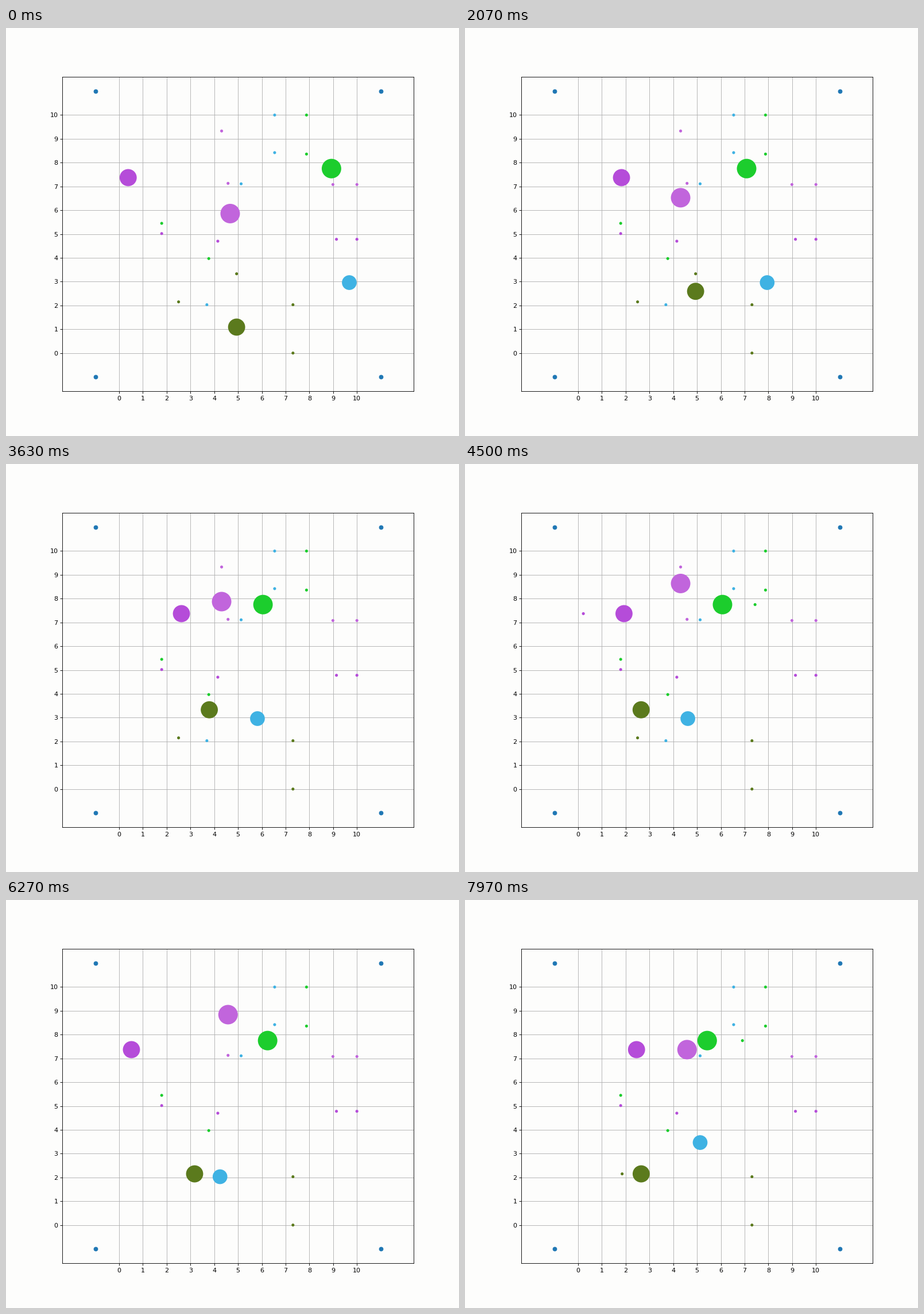
These frames come from a looping animation (789x710 px, 8 s). A matplotlib script:

```python
import numpy as np
import matplotlib.pyplot as plt
from matplotlib.animation import FuncAnimation
from matplotlib.patches import Circle

W, H, DPI = 789, 710, 80
STEP, LOOP = 20, 8000
START, FIRST_MOVE = 804, 930
NEVER = 10 * LOOP
PAPER = "#fdfdfc"
LEFT, RIGHT = 0.1246, 0.8998


class Robot:
    """Visits its goals in order at constant speed, first along x, then along y.

    yields maps a goal's index to detours (stop x, wait ms, retreat x).
    """

    def __init__(self, ax, color, radius, speed, start, goals, yields={}, pause=0):
        self.ax, self.color = ax, color
        self.speed, self.pause = speed / 1000, pause
        self.track = [(START, *start)]
        self.dots = []
        for i, (gx, gy) in enumerate(goals):
            for stop, wait, retreat in yields.get(i, []):
                self.move(x=stop)
                self.hold(wait)
                shown = self.now
                self.move(x=retreat)
                self.add_dot(retreat, self.track[-1][2], shown)
            self.move(x=gx)
            self.move(y=gy)
            self.add_dot(gx, gy, 0)
        self.track = np.array(self.track).T
        self.body = self.disc(*start, radius, 4)

    @property
    def now(self):
        return self.track[-1][0]

    def hold(self, ms):
        t, x, y = self.track[-1]
        self.track.append((t + ms, x, y))

    def move(self, x=None, y=None):
        _, x0, y0 = self.track[-1]
        x = x0 if x is None else x
        y = y0 if y is None else y
        way = abs(x - x0) + abs(y - y0)
        if way:
            self.hold(self.pause)
            self.track.append((self.now + way / self.speed, x, y))

    def disc(self, x, y, radius, z):
        return self.ax.add_patch(
            Circle((x, y), radius, color=self.color, lw=0, zorder=z))

    def add_dot(self, x, y, shown):
        self.dots.append((self.disc(x, y, 0.062, 3), shown, self.now))

    def update(self, t):
        times, xs, ys = self.track
        clock = t if t >= FIRST_MOVE else 0
        self.body.center = np.interp(clock, times, xs), np.interp(clock, times, ys)
        for dot, shown, reached in self.dots:
            dot.set_visible(shown <= t < reached)


fig, ax = plt.subplots(figsize=(W / DPI, H / DPI), dpi=DPI, facecolor=PAPER)
fig.subplots_adjust(left=LEFT, right=RIGHT)
ax.set_facecolor(PAPER)
ax.set_axisbelow(True)
ax.grid(True)
ax.set_xticks(range(11))
ax.set_yticks(range(11))
ax.scatter([-1, -1, 11, 11], [-1, 11, -1, 11])

# equal scale on both axes, centred on (5, 5)
half = 6.6
wide = half * W * (RIGHT - LEFT) / (H * 0.77)
ax.set_xlim(5 - wide, 5 + wide)
ax.set_ylim(5 - half, 5 + half)

robots = [
    Robot(ax, "#5b7a1d", 0.36, 1.3, (4.94, 1.09),
          [(4.94, 3.33), (2.5, 2.15), (7.31, 2.03), (7.31, 0)],
          {2: [(3.54, 625, 1.85)]}, pause=110),
    Robot(ax, "#3fb2e3", 0.31, 1.367, (9.68, 2.96),
          [(3.69, 2.03), (5.13, 7.11), (6.54, 8.42), (6.54, 10)]),
    Robot(ax, "#b54cd9", 0.36, 1.14, (0.38, 7.37),
          [(4.15, 4.7), (1.79, 5.02), (9.14, 4.78), (10, 4.78)],
          {0: [(2.62, 1135, 0.22)]}),
    Robot(ax, "#c165dc", 0.41, 0.865, (4.67, 5.86),
          [(4.31, 9.33), (4.58, 7.13), (8.99, 7.08), (10, 7.08)], pause=40),
    Robot(ax, "#1ccd2d", 0.41, 1.457, (8.93, 7.75),
          [(3.77, 3.97), (1.79, 5.45), (7.88, 8.36), (7.88, 10)],
          {0: [(6.05, 1715, 7.44), (5.41, 1115, 6.91)]}),
]


def draw(i):
    for robot in robots:
        robot.update((i + 0.5) * STEP)
    return []


anim = FuncAnimation(fig, draw, frames=LOOP // STEP, interval=STEP,
                     init_func=lambda: draw(0), repeat=True, repeat_delay=0)
plt.show()
```
